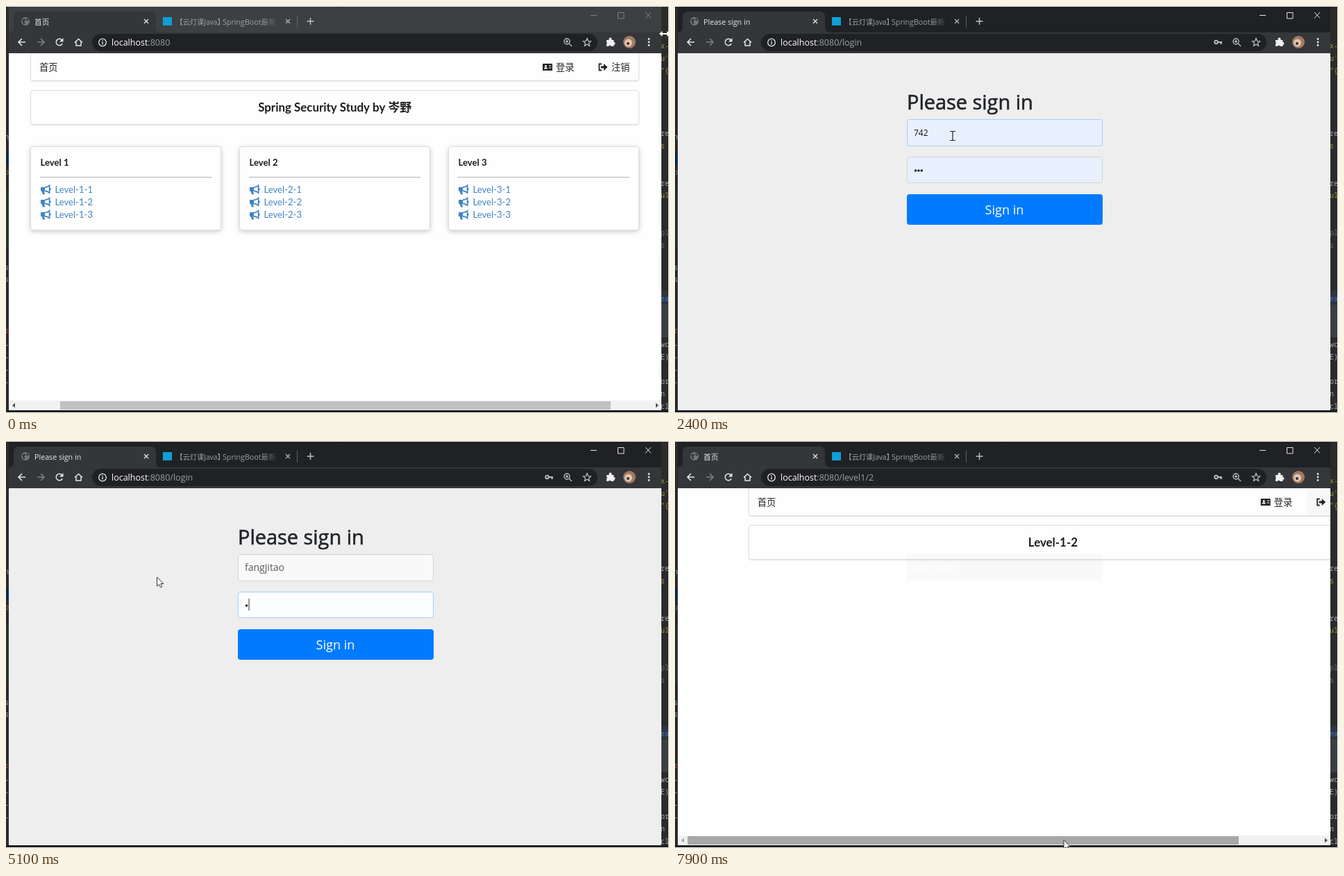
Recreate the animation shown at these times as an HTML page with a canvas. Size 955 px wide and 586 px high, loop 8 s.

```html
<!DOCTYPE html>
<html lang="zh">
<head>
<meta charset="utf-8">
<style>
html, body { margin: 0; width: 100%; height: 100%; overflow: hidden; background: #2b2b2b; }
canvas { display: block; }
</style>
</head>
<body>
<canvas id="stage" width="955" height="586"></canvas>
<script>
const ctx = document.getElementById('stage').getContext('2d');
const LOOP = 8000, STEP = 100;
const UI = '"Open Sans", "Noto Sans CJK SC", "Noto Sans CJK", sans-serif';
const WEB = 'Lato, "Noto Sans CJK SC", "Noto Sans CJK", sans-serif';
const MONO = '"Noto Sans Mono", monospace';
const USER = 'fangjitao', INK = '#222426', LINK = '#4183c4';

// Pointer path: time, x, y
const POINTER = [
  [0, 948, 40], [100, 900, 60], [200, 721, 138], [300, 534, 248], [400, 490, 291],
  [500, 478, 292], [600, 253, 281], [700, 142, 278], [900, 103.5, 281.5],
  [2000, 103.5, 281.5], [2200, 470, 285], [2400, 400, 187], [2600, 217, 195.5],
  [6200, 217, 195.5], [6400, 170, 129], [6500, 218, 149], [6600, 303, 142],
  [6900, 740, 70], [7100, 890, 46], [7200, 918, 50], [7300, 918, 106],
  [7600, 559.5, 565], [7700, 559.5, 565], [7800, 559.5, 574]
];
const COMPOSING = [
  [3000, 'f'], [3100, 'fa'], [3200, 'fan'], [3300, 'fang'], [3400, "fang'j"],
  [3600, "fang'ji"], [3700, "fang'ji't"], [3800, "fang'ji'tao"]
];
const ONE_CHAR = '方 房 放 防 仿 访 芳'.split(' ');
const TWO_CHARS = '方霁 方寄 方际 方季 方迹 房脊 防己'.split(' ');
const FULL = '方霁桃 方霁 方寄 方际 方季 方迹 房脊'.split(' ');

const between = (t, a, b) => t >= a && t < b;
const latest = (list, t) => list.filter(([at]) => at <= t).pop();

function pointerAt(t) {
  const i = POINTER.findIndex(p => p[0] > t);
  if (i < 0) return POINTER.at(-1).slice(1);
  const [t0, x0, y0] = POINTER[i - 1], [t1, x1, y1] = POINTER[i];
  const k = (t - t0) / (t1 - t0);
  return [x0 + (x1 - x0) * k, y0 + (y1 - y0) * k];
}

function rect(x, y, w, h, fill) {
  ctx.fillStyle = fill;
  ctx.fillRect(x, y, w, h);
}
function box(x, y, w, h, r, fill, stroke) {
  ctx.beginPath();
  ctx.roundRect(x, y, w, h, r);
  if (fill) { ctx.fillStyle = fill; ctx.fill(); }
  if (stroke) { ctx.strokeStyle = stroke; ctx.lineWidth = 1; ctx.stroke(); }
}
function text(str, x, y, size, color, family = UI, weight = 400, align = 'left') {
  ctx.font = `${weight} ${size}px ${family}`;
  ctx.fillStyle = color;
  ctx.textAlign = align;
  ctx.fillText(str, x, y);
  return ctx.measureText(str).width;
}
function line(d, color, width = 1.5, x = 0, y = 0) {
  ctx.save();
  ctx.translate(x, y);
  ctx.strokeStyle = color;
  ctx.lineWidth = width;
  ctx.stroke(new Path2D(d));
  ctx.restore();
}
function shape(d, color, x = 0, y = 0) {
  ctx.save();
  ctx.translate(x, y);
  ctx.fillStyle = color;
  ctx.fill(new Path2D(d), 'evenodd');
  ctx.restore();
}
function disc(x, y, r, color) {
  ctx.beginPath();
  ctx.arc(x, y, r, 0, 7);
  ctx.fillStyle = color;
  ctx.fill();
}
function ring(x, y, r, color, width = 1.4, from = 0, to = 7) {
  ctx.beginPath();
  ctx.arc(x, y, r, from, to);
  ctx.strokeStyle = color;
  ctx.lineWidth = width;
  ctx.stroke();
}
function clipped(x, y, w, h, draw) {
  ctx.save();
  ctx.beginPath();
  ctx.rect(x, y, w, h);
  ctx.clip();
  draw();
  ctx.restore();
}

function editorEdges() {
  rect(0, 0, 955, 586, '#2b2b2b');
  rect(0, 212, 4, 17, '#0d2a4d');
  rect(0, 264, 4, 84, '#29342c');
  rect(944, 410, 11, 20, '#2d3542');
  rect(944, 430, 11, 47, '#3c3f41');
  const grey = '#a0a8ae', olive = '#9a9a3c';
  [['x-', 61, olive], ["u'", 79, olive], ['"{', 97, olive], ['re', 187, grey], ['s', 205, olive],
   ['re', 259, grey], ['u1', 276, olive], ['pl', 330, '#6d6d6d'], ['s', 348, '#6d6d6d'],
   ['ea', 425, '#4a78a8'], ['wc', 491, grey], ['E)', 509, grey], ['or', 544, grey],
   ['n', 562, grey], ['cl', 580, grey]
  ].forEach(([s, y, c]) => text(s, 943, y, 10, c, MONO));
  [['n', 192, grey], ['p', 243, '#6a8759'], ['s', 380, grey], ['s', 397, grey], ['r', 471, '#a8543c'],
   ['-', 491, grey], ['-', 509, grey], ['-', 527, grey], ['-', 545, grey]
  ].forEach(([s, y, c]) => text(s, -2, y, 10, c, MONO));
}

function tabStrip(t, title, loading) {
  const active = t >= 1400;
  rect(4, 0, 940, 38, active ? '#202124' : '#3c4043');
  shape('M4 38Q11 38 11 30V16Q11 8 19 8H208Q216 8 216 16V30Q216 38 223 38Z', '#35363a');
  if (loading) {
    const a = t / 160;
    ring(28, 22, 5.5, '#9aa0a6', 1.3, a, a + 1.8);
    disc(28, 22, 2.2, '#6d7175');
  } else {
    disc(28, 22, 6, '#74787c');
    shape('M23 20Q27 17 29 20L26 22L28 25L25 26ZM30 17L33 20L31 22L29 19Z', '#35363a');
  }
  text(title, 41, 26.5, 10.7, '#e8eaed');
  line('M-3 -3L3 3M3 -3L-3 3', '#dfe1e4', 1.4, 202, 22);
  rect(226, 16, 13, 12, '#0d9fd8');
  clipped(240, 8, 154, 30, () => {
    const fade = ctx.createLinearGradient(365, 0, 394, 0);
    fade.addColorStop(0, '#9aa0a6');
    fade.addColorStop(1, 'rgba(154,160,166,.1)');
    text('【云灯课Java】', 244.5, 26.5, 10.2, fade);
    text('SpringBoot最新', 312, 26.5, 10.7, fade);
  });
  line('M-3 -3L3 3M3 -3L-3 3', '#aeb2b6', 1.4, 406, 22);
  rect(419, 14, 1, 17, '#5f6368');
  line('M-5 0H5M0 -5V5', '#bdc1c6', 1.5, 438.5, 22);
  const control = active ? '#e4e4e4' : '#7e8387';
  line('M842 13.5H851M881.5 9.5H890V18H881.5ZM921 9L929 17.5M929 9L921 17.5', control, 1);
}

function toolbar(path, loading, hasKey) {
  const white = '#e4e6e9', soft = '#bfc3c7';
  rect(4, 38, 940, 30, '#35363a');
  box(124, 40, 728, 25, 12.5, '#202124');
  line('M28 52H18M23 47L18 52L23 57', white, 1.6);
  line('M45 52H55M50 47L55 52L50 57', '#7d8084', 1.6);
  if (loading) line('M73 48L81.500 56.500M81.500 48L73 56.500', white, 1.7);
  else {
    ring(77, 52, 4.7, white, 1.6, .5, 5.5);
    shape('M82.500 46V51.500H77Z', white);
  }
  line('M99 52.500L104.500 47.500L110 52.500M101 51.500V57H108V51.500', white, 1.5);
  ring(139, 52.5, 5.3, white, 1.3);
  rect(138.3, 51.5, 1.4, 4, white);
  rect(138.3, 49.2, 1.4, 1.4, white);
  const hostWidth = text('localhost', 152, 57, 12.5, '#fff');
  text(':8080' + path, 152 + hostWidth, 57, 12.5, '#9aa0a6');
  if (hasKey) {
    ring(779.5, 52, 2.3, soft, 1.8);
    line('M782 52H788M786.500 52V55', soft, 2);
  }
  ring(808, 51, 4, soft, 1.4);
  line('M811 54L815 58M806 51H810M808 49V53', soft, 1.3);
  line('M837 46.500L838.600 50.500L842.500 50.800L839.500 53.500L840.500 57.500L837 55.300L833.500 57.500L834.500 53.500L831.500 50.800L835.400 50.500Z', soft, 1.2);
  shape('M865 49H868.500V47.500A2 2 0 0 1 872.500 47.500V49H875.500V52A2 2 0 0 1 875.500 56V58H871.700A2 2 0 0 0 868 58H865V54.500A2 2 0 0 0 865 51.500Z', '#eef0f2');
  disc(898, 52, 9, '#a5795f');
  disc(896.5, 53, 5.5, '#dcc6b4');
  disc(896, 54, 2, '#3a302c');
  [47.5, 52, 56.5].forEach(y => disc(926, y, 1.4, white));
}

function segment(x, y, w, h, raised) {
  ctx.save();
  ctx.shadowColor = raised ? 'rgba(34,36,38,.26)' : 'rgba(34,36,38,.16)';
  ctx.shadowBlur = raised ? 7 : 2;
  ctx.shadowOffsetY = raised ? 2 : 1;
  box(x + .5, y + .5, w - 1, h - 1, 3.5, '#fff');
  ctx.restore();
  box(x + .5, y + .5, w - 1, h - 1, 3.5, '#fefefe', '#dcddde');
}

// Draws page content inside the browser viewport, shifted sideways by its scroll
function viewport(shift, draw) {
  rect(4, 68, 940, 514, '#fefefe');
  clipped(4, 68, 940, 514, () => {
    ctx.translate(shift, 0);
    draw();
  });
}

function navigation(title, hoverLogout) {
  segment(35, 62, 877, 46);
  if (hoverLogout) rect(840, 69, 71, 38, '#f8f8f8');
  text('首页', 48, 93, 13.3, INK, WEB);
  shape('M773 84Q773 83 774 83H786Q787 83 787 84V93H773ZM775 90.500H780V89.500Q777.500 87 775 89.500ZM776 86.500A1.500 1.500 0 1 0 779 86.500A1.500 1.500 0 1 0 776 86.500ZM782 85.500H785.500V86.500H782ZM782 88.500H785.500V89.500H782Z', INK);
  text('登录', 792, 93, 13.3, INK, WEB);
  line('M858 83.500H854.500V92.500H858', INK, 1.8);
  shape('M857 86.500H861V83L866.500 88L861 93V89.500H857Z', INK);
  text('注销', 872, 93, 13.3, INK, WEB);
  segment(35, 121, 877, 50);
  text(title, 473.7, 152, 16.9, '#1b1c1d', WEB, 700, 'center');
}

function megaphone(x, y, color) {
  shape('M0 -2.500Q0 -3.500 1 -3.500H6V2.500H5L6 7H3L1.500 2.500H1Q0 2.500 0 1.500Z', color, x, y);
  line('M6 -3Q10 -3.500 12.600 -5.800V4.800Q10 2.500 6 2', color, 1.7, x, y);
  rect(x + 13, y - 2, 1.5, 3, color);
}

function homePage(t) {
  viewport(0, () => {
    navigation('Spring Security Study by 岑野');
    for (let level = 1; level <= 3; level++) {
      const x = 35 + (level - 1) * 301;
      segment(x, 202, 275, 121, true);
      text('Level ' + level, x + 14.5, 229.5, 13.1, '#1b1c1d', WEB, 700);
      rect(x + 14, 246, 247, 1, '#b5b5b5');
      for (let n = 1; n <= 3; n++) {
        const y = 246 + n * 18.2;
        const color = t >= 1100 && level === 1 && n === 2 ? '#1e70bf' : LINK;
        megaphone(x + 15, y, color);
        text(`Level-${level}-${n}`, x + 35.5, y + 4.6, 13.1, color, WEB);
      }
    }
  });
  scrollbar(78, 793, '#505050', '#c1c1c1');
}

function levelPage(t) {
  viewport(70.7, () => navigation('Level-1-2', t >= 7200));
  rect(334, 163, 281, 38, 'rgba(0,0,0,.018)');
  text(USER, 344, 187, 14, '#fff');
  scrollbar(18, 794, '#a3a3a3', t >= 7800 ? '#a8a8a8' : '#c1c1c1');
}

function scrollbar(x, w, leftArrow, thumb) {
  rect(4, 568, 940, 14, '#f1f1f1');
  rect(x, 569, w, 12, thumb);
  shape('M13 571.500V578.500L9 575Z', leftArrow);
  shape('M936 571.500V578.500L940 575Z', '#505050');
}

function caret(x, y) { rect(x, y, 1, 17, '#333'); }

function dots(n, y) {
  for (let i = 0; i < n; i++) disc(346.5 + i * 4.4, y, 1.8, '#26292c');
}

function signInPage(t) {
  const typing = t >= 3000, onPassword = t >= 4700, composed = t >= 4200;
  const blue = '#a3cdf7', plain = '#ced4da';
  rect(4, 68, 940, 514, '#eee');
  text('Please sign in', 334, 149, 28.9, '#212529');
  ctx.strokeStyle = '#212529';
  ctx.lineWidth = .6;
  ctx.strokeText('Please sign in', 334, 149);
  box(334.5, 163.5, 281, 38, 3, typing ? '#f9f9f9' : '#e8f0fe', onPassword ? plain : blue);
  box(334.5, 217.5, 281, 37, 3, t >= 5100 ? '#fcfdff' : '#e8f0fe', onPassword ? blue : plain);
  box(334, 271, 282, 44, 4, '#007bff');
  text('Sign in', 474.5, 300, 18.1, '#fff', UI, 400, 'center');

  if (!typing) {
    const selected = t >= 2500;
    if (selected) rect(344, 174, 21, 17, '#3390ff');
    text('742', 344, 187, 12, selected ? '#fff' : '#111');
  } else {
    const str = composed ? USER : latest(COMPOSING, t)[1];
    const w = text(str, 344, 187, 14, '#55595d');
    if (!onPassword) caret(344 + w, 173);
  }

  if (t < 5100) {
    if (onPassword) rect(344, 228, 14, 17, '#8fc0ff');
    dots(3, 237);
  } else {
    const n = Math.min(4, 1 + (t - 5100) / STEP);
    dots(n, 237);
    caret(349.5 + (n - 1) * 4.4, 227);
  }

  if (between(t, 3000, 4700)) {
    const h = t < 3100 ? 198 : composed ? 74 : 44;
    ctx.save();
    ctx.shadowColor = 'rgba(0,0,0,.3)';
    ctx.shadowBlur = 4;
    box(333.5, 202, 282.5, h, [0, 0, 4, 4], '#292a2d');
    ctx.restore();
  }
  if (between(t, 3000, 4200)) candidates(t < 3400 ? ONE_CHAR : t < 3800 ? TWO_CHARS : FULL);
}

function candidates(words) {
  const itemWidth = word => 36 + 15.5 * word.length;
  const end = 346 + words.reduce((sum, word) => sum + itemWidth(word), 0);
  const shade = ctx.createLinearGradient(428, 0, 700, 0);
  shade.addColorStop(0, '#d6d8da');
  shade.addColorStop(1, '#f0f0f0');
  box(344.5, 191.5, end - 344 + 98, 38, 0, shade, '#c9c9c9');
  rect(345, 192, itemWidth(words[0]) - 1, 38, '#7fc1f7');
  let x = 345;
  words.forEach((word, i) => {
    text(i + 1, x + 10, 217, 15.5, '#555');
    text(word, x + 26, 217, 15.5, '#111');
    x += itemWidth(word);
  });
  rect(end, 192, 1, 38, '#c9c9c9');
  rect(end + 56, 192, 1, 38, '#c9c9c9');
  line('M3 -5L-2 0L3 5', '#999', 1.1, end + 12, 211);
  line('M-2 -5L3 0L-2 5', '#222', 1.3, end + 43, 211);
  ring(end + 77, 210.5, 6, '#222', 1.2);
  ring(end + 77, 211, 3.2, '#222', 1.1, .3, 2.84);
  disc(end + 74.8, 209, .9, '#222');
  disc(end + 79.2, 209, .9, '#222');
}

function statusBubble(str) {
  ctx.font = `10.6px ${UI}`;
  box(4, 563, ctx.measureText(str).width + 11, 19, [0, 4, 0, 0], '#303134');
  text(str, 8, 577, 10.6, '#bdc1c6');
}

function pointer(t) {
  const [x, y] = pointerAt(t);
  if (t < 100) {
    shape('M-7 0L-2.500 -4V-1H4V-4L8.500 0L4 4V1H-2.500V4Z', '#fff', x, y);
  } else if (between(t, 2300, 2600) && x > 334 && y < 256) {
    line('M-4 -6.500H-1Q0 -6.500 0 -5.500Q0 -6.500 1 -6.500H4M0 -5.500V5.500M-4 6.500H-1Q0 6.500 0 5.500Q0 6.500 1 6.500H4', '#222', 1.2, x, y);
  } else {
    const arrow = 'M.5 .5V13.500L3.500 10.800L5.500 15.300L7.800 14.300L5.800 10H9.800Z';
    shape(arrow, '#fff', x, y);
    line(arrow, '#333', 1, x, y);
  }
}

// Pale hairline along the top, right and bottom of the stage
function stageEdge() {
  line('M0 .5H954.5V585.5H0', '#f4f4f4', 1);
}

function draw(t) {
  const loading = between(t, 1500, 2100) || between(t, 5800, 6100);
  const path = t < 1500 ? '' : t < 5900 ? '/login' : '/level1/2';
  const title = t < 1500 || t >= 6100 ? '首页'
    : t < 2100 || t >= 5800 ? 'localhost:8080' + path : 'Please sign in';
  editorEdges();
  tabStrip(t, title, loading);
  toolbar(path, loading, t >= 2100);
  if (t < 2000) homePage(t);
  else if (t < 5900) signInPage(t);
  else levelPage(t);
  if (between(t, 1400, 2000)) statusBubble('localhost:8080/level1/2');
  if (between(t, 7200, 7500)) statusBubble('localhost:8080/logout');
  rect(0, 582, 955, 4, '#1e1f21');
  stageEdge();
  pointer(t);
}

function tick(now) {
  draw(Math.floor(now % LOOP / STEP) * STEP);
  requestAnimationFrame(tick);
}
requestAnimationFrame(tick);
</script>
</body>
</html>
```
